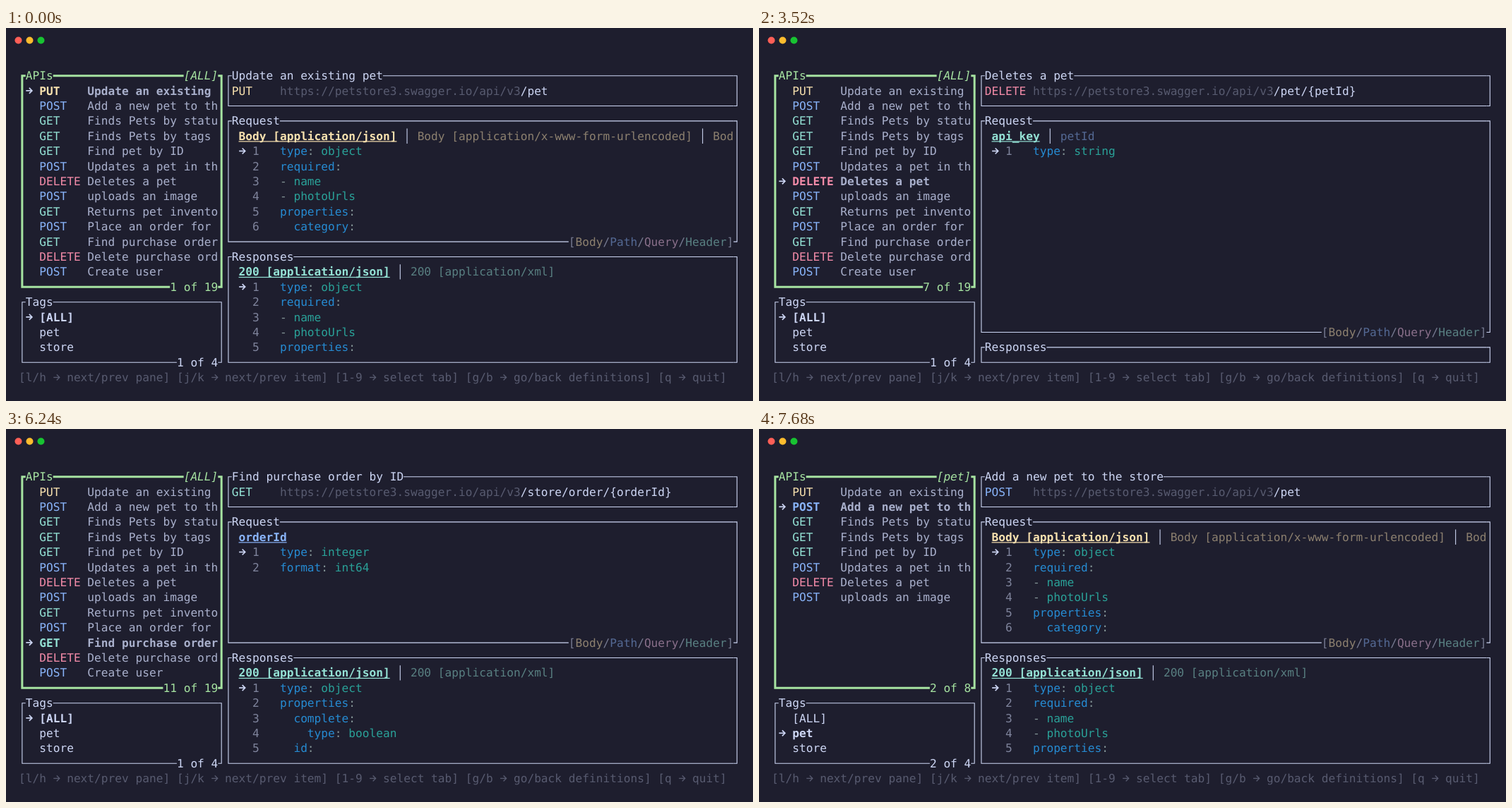
These frames come from a looping animation (1058 px wide and 529 px high, 8 s). An HTML page with a canvas:

```html
<!DOCTYPE html>
<html lang="en">
<head>
<meta charset="utf-8">
<title>API browser</title>
<style>
  html, body { margin: 0; width: 100%; height: 100%; overflow: hidden; background: #1e1e2e; }
  canvas { display: block; width: 1058px; height: 529px; }
</style>
</head>
<body>
<canvas id="stage"></canvas>
<script>
const W = 1058, H = 529, LOOP = 8000;
const CW = 9.735, RH = 21.4, X0 = 18, Y0 = 67.7, SIZE = 16.17, BASE = 5.4;
const C = {
  bg: '#1e1e2e', text: '#cdd6f4', list: '#a9b0cc', faint: '#585b70', num: '#7f849c',
  green: '#a6e3a1', yellow: '#f9e2af', blue: '#89b4fa', teal: '#94e2d5',
  red: '#f38ba8', pink: '#f5c2e7', key: '#268bd2', value: '#2aa198', punct: '#839496'
};
const METHOD = { PUT: C.yellow, POST: C.blue, GET: C.teal, DELETE: C.red };
const HOST = 'https://petstore3.swagger.io/api/v3';

const canvas = document.getElementById('stage');
const ctx = canvas.getContext('2d');
const dpr = window.devicePixelRatio || 1;
canvas.width = W * dpr;
canvas.height = H * dpr;
ctx.scale(dpr, dpr);

// Tabs are [label, colour]; schemas are lists of YAML lines.
const body = type => [`Body [application/${type}]`, C.yellow];
const path = name => [name, C.blue];
const query = name => [name, C.pink];
const header = name => [name, C.teal];
const reply = (code, ...types) => types.map(t => [`${code} [application/${t}]`, C.teal]);
const forms = ['json', 'x-www-form-urlencoded', 'xml'].map(body);
const both = reply('200', 'json', 'xml');

const int64 = ['type: integer', 'format: int64'];
const pet = ['type: object', 'required:', '- name', '- photoUrls', 'properties:', '  category:'];
const pets = ['type: array', 'items:', '  type: object', '  required:', '  - name'];
const order = ['type: object', 'properties:', '  complete:', '    type: boolean', '  id:', '    type: integer'];
const user = ['type: object', 'properties:', '  email:', '    type: string',
  '    example: nora@mail.test', '  firstName:'];
const status = ['type: string', 'enum:', '- available', '- pending', '- sold', 'default: available'];
const tags = ['type: array', 'items:', '  type: string'];
const binary = ['type: string', 'format: binary'];
const upload = ['type: object', 'properties:', '  code:', '    type: integer', '    format: int32'];
const stock = ['type: object', 'additionalProperties:', '  type: integer', '  format: int32'];

const api = (method, name, url, reqTabs, req, resTabs, res) =>
  ({ method, name, url, reqTabs, req, resTabs, res });
const APIS = [
  api('PUT', 'Update an existing pet', '/pet', forms, pet, both, pet),
  api('POST', 'Add a new pet to the store', '/pet', forms, pet, both, pet),
  api('GET', 'Finds Pets by status', '/pet/findByStatus', [query('status')], status, both, pets),
  api('GET', 'Finds Pets by tags', '/pet/findByTags', [query('tags')], tags, both, pets),
  api('GET', 'Find pet by ID', '/pet/{petId}', [path('petId')], int64, both, pet),
  api('POST', 'Updates a pet in the store with form data', '/pet/{petId}',
    [path('petId'), query('name'), query('status')], int64, [], []),
  api('DELETE', 'Deletes a pet', '/pet/{petId}',
    [header('api_key'), path('petId')], ['type: string'], [], []),
  api('POST', 'uploads an image', '/pet/{petId}/uploadImage',
    [body('octet-stream'), path('petId'), query('additionalMetadata')], binary, reply('200', 'json'), upload),
  api('GET', 'Returns pet inventories by status', '/store/inventory', [], [], reply('200', 'json'), stock),
  api('POST', 'Place an order for a pet', '/store/order', forms, order, reply('200', 'json'), order),
  api('GET', 'Find purchase order by ID', '/store/order/{orderId}', [path('orderId')], int64, both, order),
  api('DELETE', 'Delete purchase order by ID', '/store/order/{orderId}', [path('orderId')], int64, [], []),
  api('POST', 'Create user', '/user', forms, user, reply('default', 'json', 'xml'), user)
];
const TAGS = ['[ALL]', 'pet', 'store'];

// Each key press: start time, selected API, selected tag, whether Tags has focus.
const STEPS = [0, 360, 920, 1520, 2200, 2840, 3520, 4120, 4680, 5320, 6240, 6560, 6880]
  .map((at, item) => ({ at, item, tag: 0, onTags: false }));
STEPS.push(
  { at: 7160, item: 12, tag: 0, onTags: true },
  { at: 7320, item: 0, tag: 1, onTags: true },
  { at: 7640, item: 0, tag: 1, onTags: false },
  { at: 7680, item: 1, tag: 1, onTags: false }
);

const colX = col => X0 + col * CW;
const midX = col => colX(col + 0.5);
const midY = row => Y0 + row * RH;

function stroke(points, color, width) {
  ctx.strokeStyle = color;
  ctx.lineWidth = width;
  ctx.beginPath();
  points.forEach(([x, y]) => ctx.lineTo(x, y));
  ctx.stroke();
}

// Arrow with an open head, one cell wide.
function arrow(col, row, color = C.text, width = 1.7) {
  const tip = colX(col + 1) - 0.6, y = midY(row) - 0.2;
  stroke([[colX(col) + 0.6, y], [tip, y]], color, width);
  stroke([[tip - 4, y - 4], [tip, y], [tip - 4, y + 4]], color, width);
}

// Writes on the cell grid and returns the next free column.
function put(col, row, str, color, { style = '', dim = false, line = false } = {}) {
  ctx.font = `${style} ${SIZE}px "DejaVu Sans Mono", "Noto Sans Mono", monospace`;
  ctx.fillStyle = color;
  ctx.globalAlpha = dim ? 0.5 : 1;
  [...str].forEach((ch, i) => {
    if (ch === '→') arrow(col + i, row, color, 1.3);
    else if (ch !== ' ') ctx.fillText(ch, colX(col + i), midY(row) + BASE);
  });
  if (line) ctx.fillRect(colX(col), midY(row) + 7, str.length * CW, 1.2);
  ctx.globalAlpha = 1;
  return col + str.length;
}

// Frame with gaps for a title, a top right label and a bottom right label.
function pane(c0, c1, r0, r1, title, { focus = false, top = 0, bottom = 0 } = {}) {
  const color = focus ? C.green : C.text, width = focus ? 3 : 1.1;
  const l = midX(c0), r = midX(c1), t = midY(r0), b = midY(r1);
  const end = colX(c1);
  stroke([[end - bottom * CW, b], [l, b], [l, t], [colX(c0 + 1), t]], color, width);
  stroke([[colX(c0 + 1 + title.length), t], [end - top * CW, t]], color, width);
  stroke([[end, t], [r, t], [r, b], [end, b]], color, width);
  put(c0 + 1, r0, title, color);
  return color;
}

function listPane(state) {
  const items = state.tag ? APIS.slice(0, 8) : APIS;
  const count = `${state.item + 1} of ${state.tag ? 8 : 19}`;
  const label = state.tag ? '[pet]' : '[ALL]';
  const color = pane(0, 29, 0, 14, 'APIs',
    { focus: !state.onTags, top: label.length, bottom: count.length });
  put(24, 0, label, color, { style: 'italic' });
  put(29 - count.length, 14, count, color);
  items.forEach((it, i) => {
    const on = i === state.item, style = on ? 'bold' : '';
    if (on) arrow(1, i + 1);
    put(3, i + 1, it.method, METHOD[it.method], { style });
    put(10, i + 1, it.name.slice(0, 19), C.list, { style });
  });
}

function tagPane(state) {
  const count = `${state.tag + 1} of 4`;
  const color = pane(0, 29, 15, 19, 'Tags', { focus: state.onTags, bottom: count.length });
  put(29 - count.length, 19, count, color);
  TAGS.forEach((name, i) => {
    const on = i === state.tag;
    if (on) arrow(1, 16 + i);
    put(3, 16 + i, name, C.text, { style: on ? 'bold' : '' });
  });
}

function tabBar(row, tabs) {
  let col = 32;
  tabs.forEach(([label, color], i) => {
    if (i && col + 1 < 104) {
      const x = midX(col + 1);
      stroke([[x, midY(row) - RH / 2], [x, midY(row) + RH / 2]], C.text, 1.1);
      col += 3;
    }
    const str = label.slice(0, Math.max(0, 104 - col));
    col = put(col, row, str, color, i ? { dim: true } : { style: 'bold', line: true });
  });
}

function yaml(row, lines) {
  lines.forEach((text, i) => {
    const y = row + i;
    const [, indent, dash, key, colon, value] = text.match(/^( *)(- )?(?:(\w+)(:))?(.*)$/);
    if (!i) arrow(32, y);
    put(34, y, String(i + 1), C.num);
    let col = 38 + indent.length;
    if (dash) col = put(col, y, dash, C.punct);
    if (key) col = put(put(col, y, key, C.key), y, colon, C.punct);
    put(col, y, value, C.value);
  });
}

function schemaPane(title, r0, r1, tabs, lines, bottom) {
  pane(30, 104, r0, r1, title, { bottom });
  tabBar(r0 + 1, tabs);
  yaml(r0 + 2, lines.slice(0, Math.max(0, r1 - r0 - 2)));
}

function legend(row) {
  const parts = [['[', C.text], ['Body', C.yellow], ['/', C.text], ['Path', C.blue], ['/', C.text],
    ['Query', C.pink], ['/', C.text], ['Header', C.teal], [']', C.text]];
  parts.reduce((col, [str, color]) => put(col, row, str, color, { dim: true }), 80);
}

function detail(it) {
  pane(30, 104, 0, 2, it.name);
  put(31, 1, it.method, METHOD[it.method]);
  put(put(38, 1, HOST, C.faint), 1, it.url, C.text);
  const split = !it.reqTabs.length ? 4 : !it.resTabs.length ? 17 : 11;
  schemaPane('Request', 3, split, it.reqTabs, it.req, 24);
  legend(split);
  schemaPane('Responses', split + 1, 19, it.resTabs, it.res, 0);
}

function draw(state) {
  ctx.fillStyle = C.bg;
  ctx.fillRect(0, 0, W, H);
  ctx.textRendering = 'geometricPrecision';
  ['#ff5f57', '#febc2e', '#18c332'].forEach((color, i) => {
    ctx.fillStyle = color;
    ctx.beginPath();
    ctx.arc(17.5 + i * 16, 17.5, 5, 0, Math.PI * 2);
    ctx.fill();
  });
  listPane(state);
  tagPane(state);
  detail(APIS[state.item]);
  put(0, 20, '[l/h → next/prev pane] [j/k → next/prev item] [1-9 → select tab] ' +
    '[g/b → go/back definitions] [q → quit]', C.faint);
}

const began = performance.now();
let shown = null;
function tick() {
  const t = (performance.now() - began) % LOOP;
  const state = STEPS.filter(s => s.at <= t).pop();
  if (state !== shown) draw(shown = state);
  requestAnimationFrame(tick);
}
tick();
</script>
</body>
</html>
```
